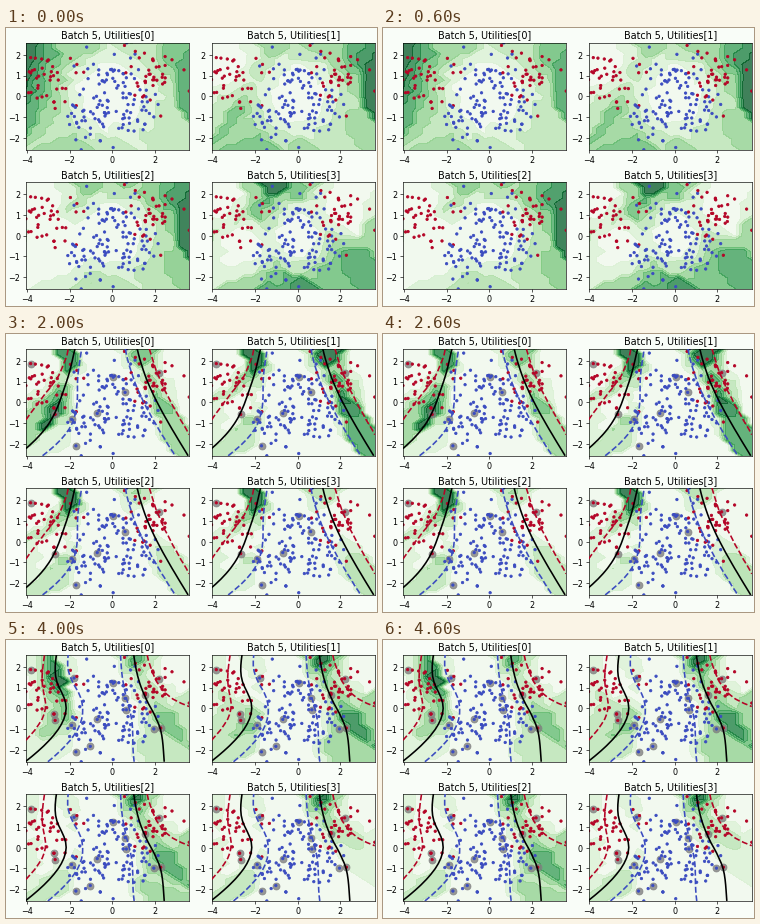
Recreate the animation shown at these times as a matplotlib script. Size 371 by 278 pixels, loop 5 s.

```python
import numpy as np
import matplotlib.pyplot as plt
from matplotlib.animation import FuncAnimation

plt.rcParams["font.family"] = "DejaVu Sans"
RED, BLUE = (180 / 255, 4 / 255, 38 / 255), (59 / 255, 76 / 255, 192 / 255)
CENTERS = [(0, 1), (-3, .5), (-1, -1), (2, 1), (1, -.5)]
GAMMA, RES = .5, 21

# Five Gaussian blobs, alternating between two classes
rng = np.random.RandomState(0)
X = np.concatenate([rng.normal(c, .7, (40, 2)) for c in CENTERS])
y = np.repeat(np.arange(5) % 2, 40)
(x0, y0), (x1, y1) = X.min(axis=0), X.max(axis=0)
GX, GY = np.meshgrid(np.linspace(x0, x1, RES), np.linspace(y0, y1, RES))
GRID = np.column_stack([GX.ravel(), GY.ravel()])


def sq_dist(a, b):
    return ((a[:, None] - b[None]) ** 2).sum(axis=-1)


# Where each round queries; the nearest sample gets its label
QUERIES = [
    [(-3.8, 1.85), (-2.68, -.6), (2.19, 1.42), (-.71, -.5)],
    [(-1.84, -.84), (.05, 1.21), (.6, .5), (-1.7, -2.09)],
    [(-2.72, -.2), (1.55, .64), (-1.04, -1.8), (1.96, -.91)],
    [(2.3, -.93), (.74, .02), (-1.77, 1.43)],
    [(-2.6, 2.1), (-2.2, .5), (2, -1.6)],
]
BATCHES = [list(sq_dist(np.array(q), X).argmin(axis=1)) for q in QUERIES]


def red_prob(points, labeled):
    """Parzen window estimate of the red class."""
    if not labeled:
        return np.full(len(points), .5)
    k = np.exp(-GAMMA * sq_dist(points, X[labeled]))
    return k @ y[labeled] / k.sum(axis=1)


def utilities(labeled, batch):
    """Squared distances in gradient space, one map per pick."""
    p = red_prob(X, labeled)
    g = (np.maximum(p, 1 - p) - 1)[:, None] * X
    d2 = (g ** 2).sum(axis=1)
    free = np.ones(len(X), bool)
    free[labeled] = False
    maps = []
    for i in range(4):
        vals = d2[free] / d2[free].sum()
        nearest = sq_dist(GRID, X[free]).argmin(axis=1)
        maps.append(vals[nearest].reshape(GX.shape))
        if i < len(batch):
            s = batch[i]
            d2 = np.minimum(d2, ((g - g[s]) ** 2).sum(axis=1))
            free[s] = False
    return maps


fig, axes = plt.subplots(2, 2, figsize=(6.4, 4.8), dpi=58,
                         layout="constrained", facecolor="#f9fdf8")
colors = [RED if c else BLUE for c in y]


def draw(step):
    labeled = sum(BATCHES[:step], [])
    prob = red_prob(GRID, labeled).reshape(GX.shape)
    maps = utilities(labeled, BATCHES[step])
    for i, (ax, util) in enumerate(zip(axes.flat, maps)):
        ax.clear()
        ax.contourf(GX, GY, util, cmap="Greens", alpha=.75)
        ax.scatter(*X.T, c=colors, marker=".", zorder=2)
        if labeled:
            ax.scatter(*X[labeled].T, c="grey", alpha=.8, marker=".", s=300)
            ax.contour(GX, GY, prob, [.5], colors="k", linewidths=2, zorder=3)
            for level, color in ((.25, BLUE), (.75, RED)):
                ax.contour(GX, GY, prob, [level], colors=[color],
                           linewidths=2, linestyles="--", zorder=3)
        ax.set_title(f"Batch 5, Utilities[{i}]")
        ax.set(xticks=[-4, -2, 0, 2], yticks=range(-2, 3))
        ax.set(xlim=(x0, x1), ylim=(y0, y1))
    return []


anim = FuncAnimation(fig, draw, frames=5, init_func=lambda: [],
                     interval=1000, repeat=True, repeat_delay=0)
plt.show()
```
